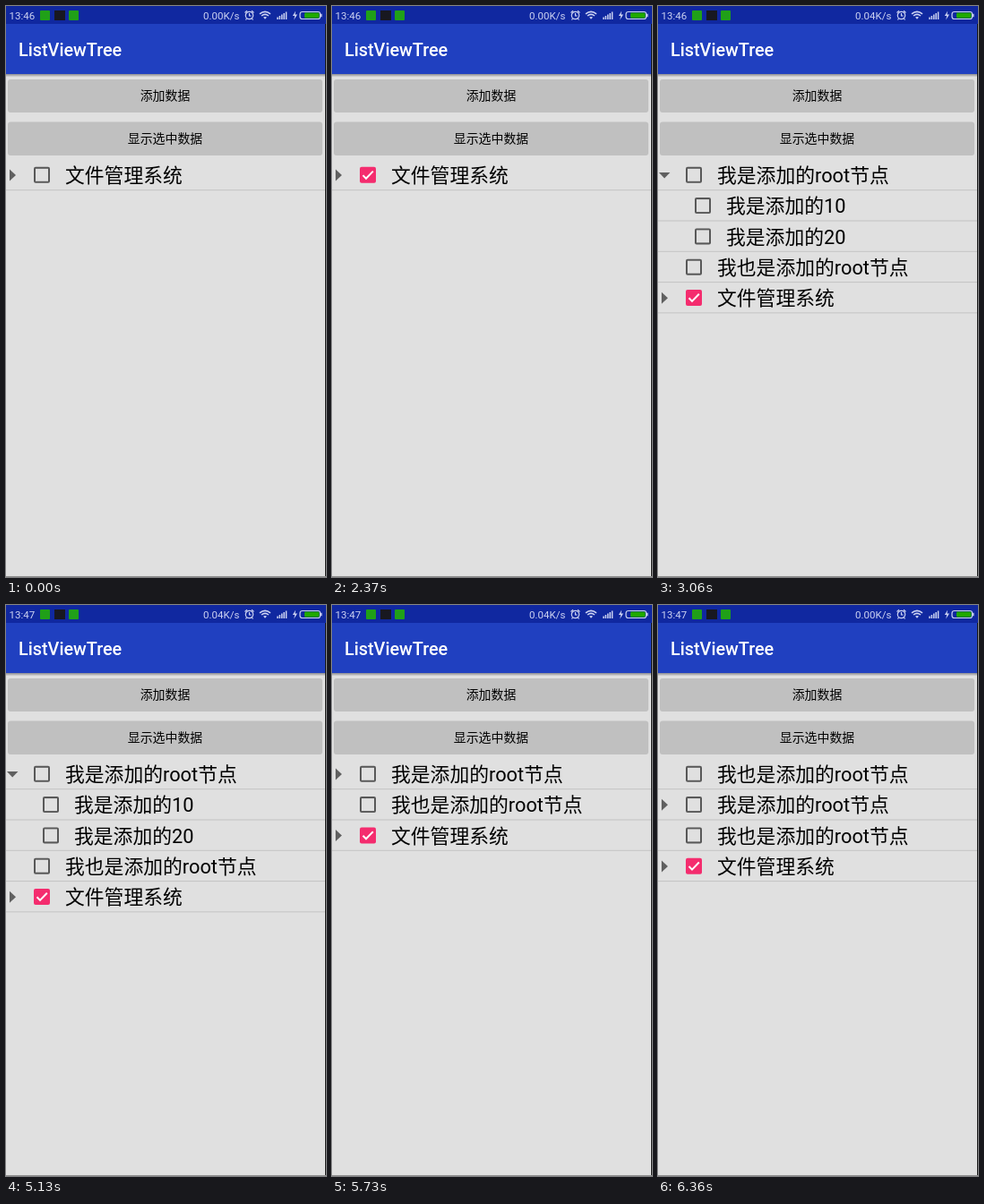
An HTML page for the animation above (8000 ms loop, 357 by 638 pixels).

```html
<!DOCTYPE html>
<html lang="zh-CN">
<head>
<meta charset="utf-8">
<title>ListViewTree</title>
<style>
  html, body { margin: 0; width: 100%; height: 100%; overflow: hidden; background: #e0e0e0; }
  svg { display: block; width: 100vw; height: 100vh; }
  text { font-family: Roboto, "Noto Sans CJK SC", "Noto Sans CJK", sans-serif; white-space: pre; }
  .status { font-size: 11.5px; fill: #cdd3f2; }
  .title { font-size: 19.8px; font-weight: 500; fill: #fff; }
  .label { font-size: 13.9px; text-anchor: middle; }
  .item { font-size: 21.8px; }
  .icon { fill: none; stroke: #cdd3f2; stroke-width: 1.2; }
</style>
</head>
<body>
<svg viewBox="0 0 357 638" preserveAspectRatio="none">
  <defs>
    <linearGradient id="shade" x2="0" y2="1">
      <stop stop-color="#8c8c90"/><stop offset="1" stop-color="#e0e0e0"/>
    </linearGradient>
    <clipPath id="addArea"><rect x="2" y="82" width="351" height="37" rx="3"/></clipPath>
  </defs>

  <rect width="357" height="638" fill="#e0e0e0"/>
  <rect width="357" height="20" fill="#1028a0"/>
  <rect y="20" width="357" height="56" fill="#2040c0"/>
  <rect y="76" width="357" height="3.5" fill="url(#shade)"/>

  <text class="status" id="clock" x="3.5" y="14.5"></text>
  <rect x="38" y="5" width="11" height="11" rx="1" fill="#20a018"/>
  <rect x="54" y="5" width="12" height="11" fill="#181820"/>
  <rect x="70" y="5" width="11" height="11" rx="1" fill="#20a018"/>
  <text class="status" id="speed" x="220" y="14.5"></text>
  <g class="icon">
    <circle cx="271.5" cy="10.5" r="4.2"/>
    <path d="M271.5 8v3h2.2M266.5 7.5l2.5-2.3M276.5 7.5l-2.5-2.3M268.5 14.2l-1 1.3M274.5 14.2l1 1.3"/>
    <path d="M283 8.8q6-5 12 0M285 11q4-3.3 8 0" stroke-width="1.6"/>
    <path d="M287 12.6q2-1.4 4 0l-2 2.2z" fill="#cdd3f2" stroke="none"/>
    <path d="M303 15v-2.5M305.4 15v-4M307.8 15v-5.5M310.2 15v-7M312.6 15v-8.5" stroke-width="1.5"/>
    <path d="M323.2 5.5l-3.4 5.6h2.4l-1 4.4 3.8-6h-2.5z" fill="#cdd3f2" stroke="none"/>
    <rect x="328" y="6.5" width="22.5" height="8" rx="2.5"/>
    <path d="M351.8 8.8v3.4" stroke-width="1.4"/>
  </g>
  <rect x="333" y="7.5" width="16.5" height="6" rx="1" fill="#20a800"/>

  <text class="title" x="14" y="55.8">ListViewTree</text>

  <rect x="2" y="82" width="351" height="37" rx="3" fill="#c0c0c0"/>
  <rect x="2" y="129.5" width="351" height="37.5" rx="3" fill="#c0c0c0"/>
  <g clip-path="url(#addArea)"><circle id="ripple" cx="214" cy="100" r="0" fill="#b0b0b0"/></g>
  <text class="label" x="177.5" y="105.2">添加数据</text>
  <text class="label" x="177.5" y="153.2">显示选中数据</text>

  <rect id="press" y="172" width="356" height="33.5" fill="#d0d0d0" opacity="0"/>
  <g id="list"></g>

  <rect x="356" y="20" width="1" height="618" fill="#181818"/>
  <rect y="637" width="357" height="1" fill="#909090"/>
</svg>

<script>
const LOOP = 8000, TICK = 30, ROW = 34.3;
const OFF = 0, ON = 4;
const MINUTE = 5130, CHECK = 2250, ADD_1 = 2940, FOLD = 5580, ADD_2 = 6090, IDLE = 6360;
const el = id => document.getElementById(id);
const clamp = (v, lo, hi) => Math.min(hi, Math.max(lo, v));
const ticks = (t, start) => Math.floor((t - start) / TICK);

// level 0..4: outline, hole closing, solid, tick growing, ticked
function checkbox(x, y, level) {
  const hole = level < 1 ? 14 - 10 * level : Math.max(0, 4 * (2 - level));
  const size = clamp((level - 2) / 2, 0, 1);
  const color = level < 2 ? '#585858' : '#f42c6e';
  return `<g transform="translate(${x} ${y})">
    <rect x="-9" y="-9" width="18" height="18" rx="2" fill="${color}"/>
    <rect x="${-hole / 2}" y="${-hole / 2}" width="${hole}" height="${hole}" fill="#e0e0e0"/>
    <path d="M-5.5 .3L-2 3.9 5.8-4.2" transform="scale(${size})" fill="none" stroke="#fff" stroke-width="2"/></g>`;
}

function row([text, level, arrow, indent = 0], i) {
  const y = 189 + ROW * i;
  const shape = { right: 'M4 -6.5L11 0 4 6.5z', down: 'M1 -3H13.5L7.2 3.5z' }[arrow];
  return (shape ? `<path d="${shape}" transform="translate(0 ${y})" fill="#606060"/>` : '') +
    checkbox(40 + indent, y - .2, level) +
    `<text class="item" x="${66 + indent}" y="${y + 8}">${text}</text>` +
    `<rect y="${y + 16.2}" width="356" height="1" fill="#c4c4c4"/>`;
}

const files = level => ['文件管理系统', level, 'right'];
const root = (level, arrow) => ['我是添加的root节点', level, arrow];
const also = level => ['我也是添加的root节点', level];
const child = n => ['我是添加的' + n, OFF, '', 10];

function rowsAt(t) {
  if (t < ADD_1) return [files(clamp(.8 * (ticks(t, CHECK) + 1), OFF, ON))];
  if (t < FOLD) {
    const k = Math.min(4, ticks(t, ADD_1));
    return [root(ON - k, 'down'), child(10), child(20), also(OFF), files(1 + .75 * k)];
  }
  if (t < ADD_2) {
    const k = Math.min(5, ticks(t, FOLD));
    return [root(OFF, 'right'), also(OFF), files(.1 + .78 * k)];
  }
  const k = Math.min(4, ticks(t, ADD_2));
  return [also(OFF), root(OFF, 'right'), also(ON - k), files(1 + .75 * k)];
}

let shown = '';
function render(t) {
  el('clock').textContent = t < MINUTE ? '13:46' : '13:47';
  el('speed').textContent = t >= ADD_1 && t < IDLE ? '0.04K/s' : '0.00K/s';

  const tap = ticks(t, t < ADD_2 ? ADD_1 : ADD_2);
  const rippling = tap >= 0 && tap < 4;
  el('ripple').setAttribute('r', rippling ? 90 + 40 * tap : 0);
  el('ripple').setAttribute('opacity', rippling ? 1 - tap / 4 : 0);

  const fold = ticks(t, FOLD);
  el('press').setAttribute('opacity', fold >= 0 ? clamp(1 - fold / 5, 0, 1) : 0);

  const markup = rowsAt(t).map(row).join('');
  if (markup !== shown) el('list').innerHTML = shown = markup;
}

const begin = performance.now();
function frame() {
  render((performance.now() - begin) % LOOP);
  requestAnimationFrame(frame);
}
frame();
</script>
</body>
</html>
```
